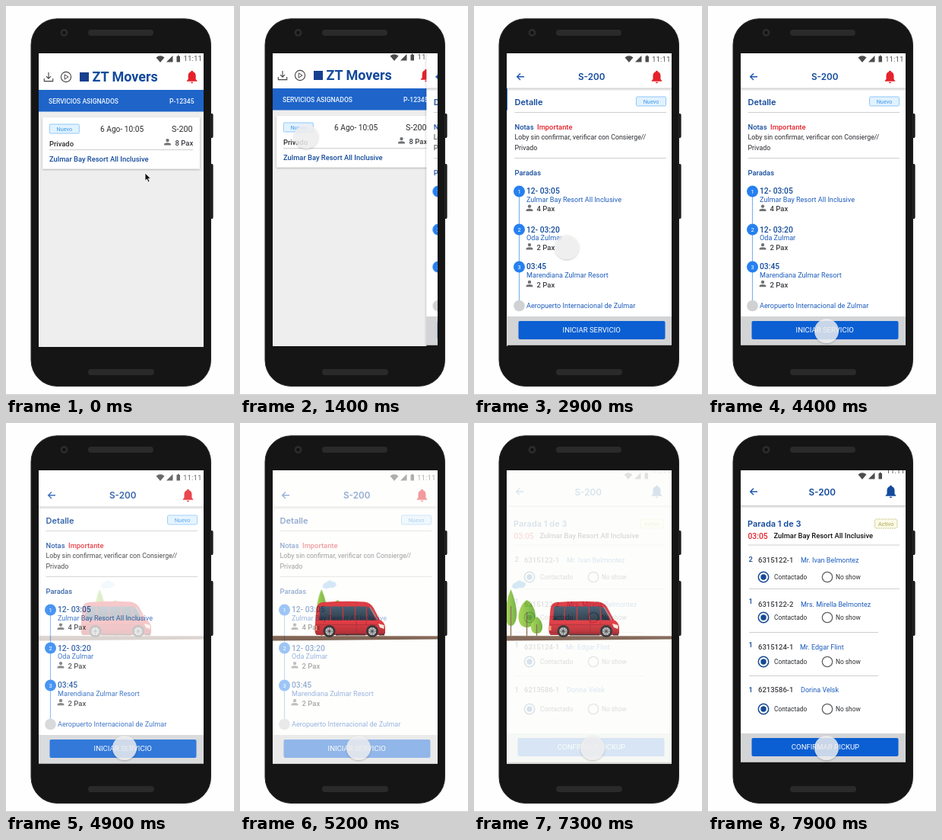
Animation of 300 by 510 pixels, one loop 8 s. Source, as an HTML page:

```html
<!DOCTYPE html>
<html lang="es">
<head>
<meta charset="utf-8">
<title>Traslados</title>
<style>
  html, body { margin: 0; width: 100%; height: 100%; overflow: hidden; background: #fefefe; }
  svg { display: block; width: 100%; height: 100%; }
  text { font-family: Roboto, Inter, sans-serif; font-size: 9.1px; fill: #2a2c30; white-space: pre; }

  .navy { fill: #134a9c; }
  .blue { fill: #1c5cbc; }
  .red { fill: #e5222b; }
  .brand { font-size: 18px; font-weight: 700; }
  .bar { font-size: 8.55px; font-weight: 500; fill: #eef4ff; }
  .head, .title { font-family: Inter, Roboto, sans-serif; font-weight: 600; }
  .head { font-size: 11.7px; }
  .title { font-size: 11px; }
  .sub { font-size: 9.4px; font-weight: 500; }
  .hour { font-size: 10.3px; font-weight: 500; }
  .pax { font-size: 9.5px; font-weight: 500; fill: #3a3c40; }
  .note { font-size: 8.85px; }
  .tag { font-size: 7.3px; fill: #3f97ea; text-anchor: middle; }
  .cta { font-size: 9.55px; fill: #fff; text-anchor: middle; }
  .num { font-size: 7.5px; fill: #fff; text-anchor: middle; }
  .opt { font-size: 8.35px; }
  .name { font-size: 9px; }
  .clock { font-size: 9.8px; fill: #555; }
  .rule { stroke: #cfcfcf; }

  .list, .detail, .veil, .ride, .pickup, .trees, .touch, .arrow, .dot { animation: 8s linear infinite; }
  .list { animation-name: list; }
  .detail { animation-name: detail; }
  .veil { animation-name: veil; }
  .ride { animation-name: ride; mix-blend-mode: multiply; }
  .pickup { animation-name: pickup; }
  .trees { animation-name: trees; }
  .touch { animation-name: touch; }
  .arrow { animation-name: arrow; }
  .dot { animation-name: dot; }

  @keyframes list {
    0%, 14.99% { transform: none; }
    15%, 100% { transform: translateY(-2px); }
  }
  @keyframes detail {
    0% { transform: translate(220px, 0); }
    15% { transform: translate(217px, 0); animation-timing-function: ease-in-out; }
    28.75%, 44.99% { transform: translate(1px, 0); }
    45%, 59.74% { transform: translate(0, 0); }
    59.75%, 100% { transform: translate(0, 2px); }
  }
  @keyframes veil {
    0%, 59.75% { opacity: 0; }
    69.25%, 100% { opacity: 1; }
  }
  @keyframes ride {
    0%, 59.75% { opacity: 0; }
    65.75%, 100% { opacity: 1; }
  }
  @keyframes pickup {
    0%, 90% { opacity: 0; }
    98.2%, 100% { opacity: 1; }
  }
  @keyframes trees {
    0%, 59.75% { transform: translateX(70px); }
    76.25%, 78.75% { transform: none; }
    81.25%, 100% { transform: translateX(-11px); }
  }
  @keyframes touch {
    0%, 1.25% { transform: translate(183px, 219px); animation-timing-function: ease-in-out; }
    11.25%, 25% { transform: translate(87px, 171px); animation-timing-function: ease-in; }
    36.25% { transform: translate(122px, 316px); animation-timing-function: ease-out; }
    40%, 45% { transform: translate(126px, 332px); animation-timing-function: ease-in-out; }
    53.5%, 100% { transform: translate(156px, 426px); }
  }
  @keyframes arrow {
    0%, 1.24% { opacity: 1; }
    1.25%, 100% { opacity: 0; }
  }
  @keyframes dot {
    0%, 1.24% { opacity: 0; }
    1.25%, 100% { opacity: 1; }
  }
</style>
</head>
<body>
<svg viewBox="0 0 300 510">
  <defs>
    <clipPath id="screen"><rect x="43" y="62" width="217" height="385"/></clipPath>
    <linearGradient id="shade" x2="0" y2="1">
      <stop stop-color="#000" stop-opacity=".2"/><stop offset="1" stop-color="#000" stop-opacity="0"/>
    </linearGradient>
    <linearGradient id="leaf">
      <stop stop-color="#9bd03c"/><stop offset="1" stop-color="#5fa529"/>
    </linearGradient>
    <linearGradient id="paint" x2="0" y2="1">
      <stop stop-color="#d8222a"/><stop offset=".6" stop-color="#e0212a"/><stop offset="1" stop-color="#a3121a"/>
    </linearGradient>
    <linearGradient id="glass" x2="0" y2="1">
      <stop stop-color="#2b4963"/><stop offset="1" stop-color="#12202f"/>
    </linearGradient>
    <filter id="soft" x="-50%" y="-50%" width="200%" height="200%">
      <feDropShadow dx="0" dy="1" stdDeviation="1.3" flood-opacity=".3"/>
    </filter>

    <g id="page">
      <rect x="43" y="58" width="218" height="386.5" fill="#fff"/>
      <rect x="43" y="444.5" width="218" height="6" fill="#151515"/>
    </g>
    <g id="signals" fill="#4c4c4c">
      <path d="M197.5 67.5Q203 62.8 208.5 67.5L203 74Z"/>
      <path d="M219.5 65V73.5H211Z"/>
      <path d="M224.5 66H225.8V64.8H227.7V66H229V73.5H224.5Z"/>
    </g>
    <path id="bell" d="M0-8.2C1.1-8.2 1.5-7.4 1.5-6.7C4-6 5-4 5-1.6V3L6.8 4.9V5.8H-6.8V4.9L-5 3V-1.6C-5-4-4-6-1.5-6.7C-1.5-7.4-1.1-8.2 0-8.2ZM-1.8 6.7H1.8Q1.3 8.2 0 8.2Q-1.3 8.2-1.8 6.7Z"/>
    <path id="back" d="M5 0H-4M0-4.2L-4.3 0L0 4.2" fill="none" stroke="#1c56b0" stroke-width="1.4"/>
    <g id="person" fill="#707276">
      <circle cy="-2.4" r="2.2"/><path d="M-4.4 4V2.6Q-4 .8 0 .7Q4 .8 4.4 2.6V4Z"/>
    </g>
    <g id="tag">
      <rect x="-19.5" y="-6" width="39" height="12" rx="1.5" fill="#e1f2ff" stroke="#86c3f8" stroke-width=".9"/>
      <text class="tag" y="2.6">Nuevo</text>
    </g>
    <g id="foot">
      <rect x="43" y="407" width="217" height="37.5" fill="#d3d4d6"/>
      <rect x="57.5" y="413" width="193" height="24" rx="2" fill="#0b5fd3"/>
    </g>
    <g id="on">
      <circle r="6.7" fill="#fff" stroke="#164a94" stroke-width="1.5"/><circle r="3.7" fill="#164a94"/>
    </g>
    <circle id="off" r="6.7" fill="#fff" stroke="#606266" stroke-width="1.3"/>
    <g id="choices">
      <use href="#on" x="73"/><text class="opt" x="87" y="3.3">Contactado</text>
      <use href="#off" x="157"/><text class="opt" x="168" y="3.3">No show</text>
    </g>
    <g id="wheel">
      <circle r="8" fill="#1d1a1c"/><circle r="5.2" fill="#b9bbbd"/>
      <path d="M-5 0H5M0-5V5M-3.5-3.5L3.5 3.5M-3.5 3.5L3.5-3.5" stroke="#55585b"/>
      <circle r="1.6" fill="#3a3a3c"/>
    </g>
  </defs>

  <!-- phone -->
  <rect y="509" width="300" height="1" fill="#cdcdcd"/>
  <path d="M268 141H271Q272.6 141 272.6 143V171Q272.6 173 271 173H268ZM268 207H271Q272.6 207 272.6 209V277Q272.6 279 271 279H268Z" fill="#1b1b1b"/>
  <rect x="33" y="16.8" width="236.5" height="481.6" rx="34" fill="#151515" stroke="#262626"/>
  <circle cx="76.5" cy="35" r="5" fill="#2b2b2d"/><circle cx="76.5" cy="35" r="2.2" fill="#111"/>
  <rect x="108" y="31" width="86" height="8" rx="4" fill="#2a2a2a"/>
  <rect x="108" y="476" width="87" height="8" rx="4" fill="#2a2a2a"/>

  <g clip-path="url(#screen)">
    <!-- assigned services -->
    <g class="list">
      <rect x="43" y="62" width="217" height="386" fill="#eeeeee"/>
      <rect x="43" y="62" width="217" height="49" fill="#fff"/>
      <use href="#signals"/><text class="clock" x="233.5" y="72.3">11:11</text>
      <path d="M56 87V95M53 92.2L56 95.2L59 92.2M50.3 95V98.6H61.7V95" fill="none" stroke="#444" stroke-width="1.1"/>
      <circle cx="79" cy="93" r="6.6" fill="none" stroke="#444" stroke-width="1.1"/>
      <path d="M77.2 89.9L82 93L77.2 96.1Z" fill="none" stroke="#444"/>
      <rect x="97" y="87" width="12" height="12" fill="#173f8f"/>
      <text class="brand navy" x="113.5" y="99.3">ZT Movers</text>
      <use href="#bell" class="red" x="244.7" y="93"/>
      <rect x="43" y="110" width="217" height="28.5" fill="#1e64c9"/>
      <text class="bar" x="56" y="127.5">SERVICIOS ASIGNADOS</text>
      <text class="bar" x="215" y="127.5">P-12345</text>
      <rect x="48" y="146" width="207" height="67.5" fill="#fff" filter="url(#soft)"/>
      <use href="#tag" x="76.8" y="161"/>
      <text x="124" y="165" style="font-size:10.2px">6 Ago- 10:05</text>
      <text x="218" y="164.5" style="font-size:10.8px">S-200</text>
      <text class="sub" x="57" y="183.7">Privado</text>
      <use href="#person" x="212.5" y="178.5"/>
      <text class="pax" x="222.5" y="183.2">8 Pax</text>
      <path class="rule" d="M57 188.5H246"/>
      <text class="sub navy" x="57" y="203.5">Zulmar Bay Resort All Inclusive</text>
    </g>

    <!-- service detail -->
    <g class="detail">
      <rect x="41" y="62" width="2" height="386" opacity=".08"/>
      <use href="#page"/>
      <use href="#signals"/><text class="clock" x="233" y="72.5">11:11</text>
      <use href="#back" x="60" y="92.7"/>
      <text class="head navy" x="136" y="97">S-200</text>
      <use href="#bell" class="red" x="239.5" y="93"/>
      <rect x="43" y="107.5" width="217" height="4" fill="url(#shade)"/>
      <text class="title navy" x="52.5" y="130">Detalle</text>
      <use href="#tag" x="232" y="125"/>
      <path class="rule" d="M52.5 139.5H252M52.5 199.5H252"/>
      <text class="sub navy" x="52.5" y="162">Notas</text>
      <text class="sub red" x="82" y="162">Importante</text>
      <text class="note" x="52.5" y="175">Loby sin confirmar, verificar con Consierge//</text>
      <text class="note" x="52.5" y="189.3">Privado</text>
      <text class="sub navy" x="52.5" y="222.3">Paradas</text>
      <path d="M58.5 243V393" stroke="#7db5f2" stroke-width="1.2"/>
      <g fill="#2680f0">
        <circle cx="58.5" cy="243" r="7.5"/><circle cx="58.5" cy="293" r="7.5"/><circle cx="58.5" cy="342" r="7.5"/>
      </g>
      <circle cx="58.5" cy="393" r="7.3" fill="#d0d1d3"/>
      <text class="num" x="58.5" y="245.7">1</text>
      <text class="num" x="58.5" y="295.7">2</text>
      <text class="num" x="58.5" y="344.7">3</text>
      <text class="hour navy" x="68" y="246.3">12- 03:05</text>
      <text class="blue" x="68" y="256.7">Zulmar Bay Resort All Inclusive</text>
      <use href="#person" x="72" y="265"/><text class="pax" x="81.5" y="269">4 Pax</text>
      <text class="hour navy" x="68" y="297">12- 03:20</text>
      <text class="blue" x="68" y="307.2">Oda Zulmar</text>
      <use href="#person" x="72" y="315.5"/><text class="pax" x="81.5" y="319.7">2 Pax</text>
      <text class="hour navy" x="68" y="345.3">03:45</text>
      <text class="blue" x="68" y="355.7">Marendiana Zulmar Resort</text>
      <use href="#person" x="72" y="364.3"/><text class="pax" x="81.5" y="368.5">2 Pax</text>
      <text class="blue" x="68" y="396.3">Aeropuerto Internacional de Zulmar</text>
      <use href="#foot"/><text class="cta" x="153.7" y="428.3">INICIAR SERVICIO</text>
    </g>

    <!-- on the road -->
    <rect class="veil" x="43" y="62" width="217" height="386" fill="#fdfefb"/>
    <g class="ride">
      <g class="trees">
        <path d="M61 215Q61 210 66 209Q70 204 74 208Q79 208 79 212Q78 217 70 216Q64 219 61 215Z" fill="#cfe5f7"/>
        <g fill="url(#leaf)">
          <path d="M59.5 218C64 228 68 243 67 254C66 262 63 266 59.5 266C56 266 53 262 52.5 254C52 243 55 228 59.5 218Z"/>
          <path d="M80.5 232C88 236 92 246 92 254C92 263 87 268 80.5 268C74 268 69.5 263 69.5 254C69.5 246 74 236 80.5 232Z"/>
          <path d="M93.5 254C98 256 101 262 101 267C101 273 98 276 93.5 276C89 276 86 273 86 267C86 262 89 256 93.5 254Z"/>
        </g>
        <path d="M59.5 240V279M80.5 248V279M93.5 264V279" stroke="#79613a" stroke-width="1.4"/>
      </g>
      <path d="M43 279L260 279.5V283.5L43 285.5Z" fill="#70503f"/>
      <path d="M43 279.3L260 279.8" stroke="#9a7a66" stroke-width=".8"/>
      <path d="M101 278Q98 276 98.5 268L100.5 244Q101.5 235.5 109 235Q140 233 164 234.5Q171 235 175.5 242L184 258Q190.5 261 191 268V275Q191 278 187 278Z" fill="url(#paint)"/>
      <path d="M105.5 240.5H165Q170 240.5 172 244L179 258.5H104Z" fill="url(#glass)"/>
      <path d="M119 240V259M135.5 240V259M151.5 240V259M166 240L167 259" stroke="#b81d25" stroke-width="1.5"/>
      <path d="M171 241.5L181 258" stroke="#7f93a5" stroke-width="1.2"/>
      <path d="M101 264.5H180M153 260V276M166 260V265" fill="none" stroke="#9d141c" stroke-width=".8"/>
      <path d="M182 263L189.5 265V270L184 268Z" fill="#f4e9dd"/>
      <path d="M99 266H101.5V272H98.5Z" fill="#ff8b62"/>
      <path d="M126 277.5H165M183 277.5H190" stroke="#3a1215" stroke-width="2"/>
      <use href="#wheel" x="117.5" y="273"/><use href="#wheel" x="174" y="273"/>
    </g>

    <!-- pickup list -->
    <g class="pickup">
      <use href="#page"/>
      <use href="#signals"/><text class="clock" x="234.5" y="65.8">11:11</text>
      <use href="#back" x="60" y="90"/>
      <text class="head navy" x="132.5" y="95.3">S-200</text>
      <use href="#bell" class="navy" x="240.5" y="90"/>
      <rect x="43" y="108" width="217" height="4" fill="url(#shade)"/>
      <text class="title navy" x="52" y="136">Parada 1 de 3</text>
      <rect x="219.5" y="126" width="29.5" height="12" rx="2" fill="#fbfae6" stroke="#c9c58a" stroke-dasharray="2 1"/>
      <text class="tag" x="234.3" y="134.5" style="fill:#aaa552">Activo</text>
      <text class="hour red" x="52.5" y="152.3">03:05</text>
      <text class="sub" x="86.5" y="151" style="fill:#111">Zulmar Bay Resort All Inclusive</text>
      <path class="rule" d="M53 160H252M54 217.5H252M54 274.5H224M54 331.5H224"/>

      <text class="sub navy" x="53.5" y="181.5">2</text>
      <text class="pax" x="66" y="182.5">6315122-1</text>
      <text class="name blue" x="122" y="182.5">Mr. Ivan Belmontez</text>
      <use href="#choices" y="202"/>
      <text class="sub navy" x="53.5" y="237">1</text>
      <text class="pax" x="66" y="240.5">6315122-2</text>
      <text class="name blue" x="122" y="240.5">Mrs. Mirella Belmontez</text>
      <use href="#choices" y="255"/>
      <text class="sub navy" x="53.5" y="293.5">1</text>
      <text class="pax" x="66" y="297">6315124-1</text>
      <text class="name blue" x="121" y="297">Mr. Edgar Flint</text>
      <use href="#choices" y="313"/>
      <text class="sub navy" x="53.5" y="353">1</text>
      <text class="pax" x="66" y="353">6213586-1</text>
      <text class="name blue" x="122" y="353">Dorina Velsk</text>
      <use href="#choices" y="375"/>
      <use href="#foot"/><text class="cta" x="154.5" y="428.3">CONFIRMAR PICKUP</text>
    </g>
  </g>

  <!-- pointer -->
  <g class="touch">
    <circle class="dot" r="16" fill="#f2f3f4" fill-opacity=".8" filter="url(#soft)"/>
    <path class="arrow" d="M0 0V10.2L2.4 8L4.1 12L6 11.2L4.3 7.3H7.5Z" fill="#111" stroke="#fff" stroke-width=".8"/>
  </g>
</svg>
</body>
</html>
```
